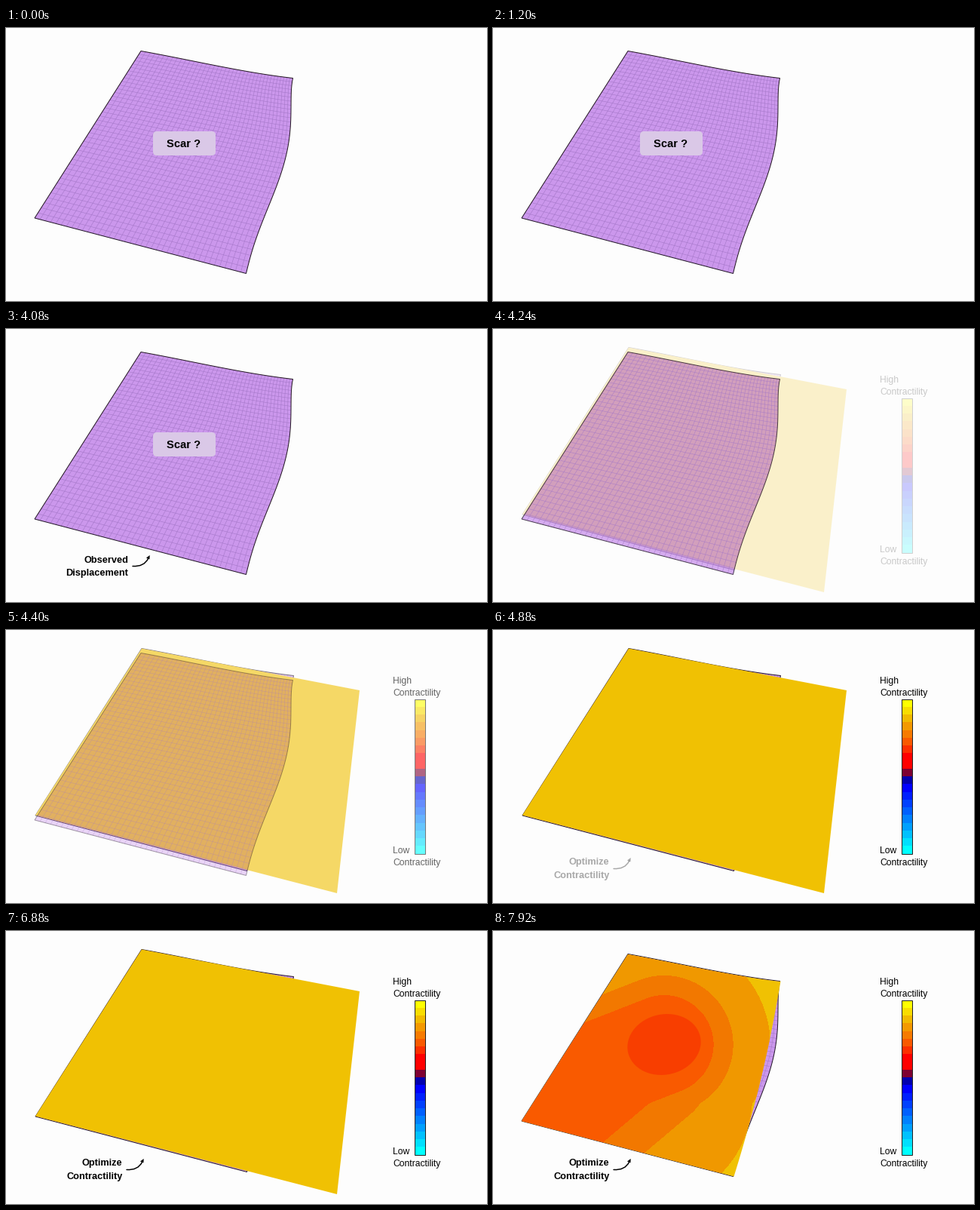
A matplotlib script for the animation above (8000 ms loop, 638 by 362 pixels).

```python
import numpy as np
import matplotlib.pyplot as plt
from matplotlib.animation import FuncAnimation
from matplotlib.collections import LineCollection
from matplotlib.colors import LinearSegmentedColormap
from matplotlib.patches import Ellipse, FancyBboxPatch, PathPatch, Polygon, Rectangle
from matplotlib.path import Path
from matplotlib.transforms import Affine2D

W, H, DPI = 638, 362, 100
STEP, FRAMES = 80, 100
PX = 72 / DPI
PAPER = "#fdfdfd"

plt.rcParams["font.family"] = "Liberation Sans"
fig = plt.figure(figsize=(W / DPI, H / DPI), dpi=DPI, facecolor=PAPER)
ax = fig.add_axes([0, 0, 1, 1])
ax.set(xlim=(0, W), ylim=(H, 0))
ax.axis("off")


def ramp(t, start, end):
    return float(np.clip((t - start) / (end - start), 0, 1))


# Sheet geometry: u runs along the top edge, v down the right edge
k = np.linspace(0, 1, 61)
A, B, C, D = np.array([(179, 30.5), (380.5, 66.5), (318.5, 325.5), (38, 252)])


def between(p, q, s):
    return p + np.asarray(s)[:, None] * (q - p)


def shifted(points, dx=0, dy=0):
    return points + np.c_[dx + 0 * points[:, 0], dy + 0 * points[:, 0]]


def sag(u):
    return 13 * u**2 * (1 - u)


def right_edge(v):
    return shifted(between(B, C, v), dx=322 * v**1.8 * (1 - v)**2.7)


top = shifted(between(A, B, k), dy=sag(k))
outline = np.vstack([top, right_edge(k), D])
fitted_right = shifted(between(B, C, k), dx=1 + 19 * k * (1 - k))
fitted = np.vstack([shifted(top, dy=0.5), fitted_right, D])

corners = np.array([(180, 24.5), (469, 80), (439, 349), (39, 245.5)])
flat = np.vstack([between(corners[0], corners[1], k),
                  between(corners[1], corners[2], k), corners[3]])


def mesh_line(u, v):
    v = v * (0.75 + 0.25 * v)
    s = u + 0.25 * u * (1 - u) * (1 - v)
    left = between(A, D, v)
    return shifted(left + s[:, None] * (right_edge(v) - left), dy=sag(s) * (1 - v))


ticks = [np.full_like(k, c) for c in np.linspace(0, 1, 41)[1:-1]]
mesh = [mesh_line(c, k) for c in ticks] + [mesh_line(k, c) for c in ticks]


def measured_sheet(z, transform=ax.transData):
    parts = [Polygon(outline, fc="#cb97ec", ec="none", zorder=z),
             LineCollection(mesh, colors="#a477c8", linewidths=0.55 * PX, zorder=z + 0.1),
             Polygon(outline, fill=False, ec="#24182a", lw=PX, zorder=z + 0.2)]
    for part in parts:
        ax.add_artist(part)
        part.set_transform(transform)
    return parts


def text(x, y, s, size, bold=False, **kw):
    return ax.text(x, y, s, fontsize=size * PX, color="black", va="baseline",
                   weight="bold" if bold else "normal", **kw)


def callout(lines, x, y, tail):
    """Two right-aligned lines with a small curved arrow."""
    parts = [text(x, y + 17.5 * i, s, 12.8, True, ha="right", zorder=20)
             for i, s in enumerate(lines)]
    curve = Path(np.array([(0, 0), (15, 1), (20.5, -10)]) + tail,
                 [Path.MOVETO, Path.CURVE3, Path.CURVE3])
    parts.append(ax.add_patch(PathPatch(curve, fill=False, lw=1.5 * PX,
                                        capstyle="round", zorder=20)))
    head = np.array([(22.7, -14.5), (22.4, -9), (18, -11)]) + tail
    parts.append(ax.add_patch(Polygon(head, fc="black", ec="none", zorder=20)))
    return parts


def set_alpha(parts, alpha):
    for part in parts:
        part.set_alpha(alpha)
        part.set_visible(alpha > 0)


# Opening scene, which dissolves over the model scene
frame_path = Path([(0, 0), (0, H), (W, H), (W, 0), (0, 0)], closed=True)
veil_path = Path.make_compound_path(
    frame_path, Path(np.vstack([outline, outline[:1]]), closed=True))
veil = ax.add_patch(PathPatch(veil_path, fc=PAPER, ec="none", zorder=10))
opening = [veil] + measured_sheet(11)

badge = ax.add_patch(FancyBboxPatch((200, 142), 73, 22, fc="#dac8e7", ec="none",
                                    boxstyle="round,pad=5,rounding_size=5", zorder=14))
scar = [badge, text(236, 158.5, "Scar ?", 14.8, True, ha="center", zorder=20)]
observed = callout(["Observed", "Displacement"], 162, 310, (168, 314.5))

# Model scene
shift = Affine2D()
measured_sheet(1, shift + ax.transData)
model = ax.add_patch(Polygon(flat, fc="#f0c103", ec="none", zorder=3))

# Contractility falls off with distance from a ray running to the lower left
core = np.array([227, 150.5])
axis = np.array([-0.93, 0.363])
gx, gy = np.meshgrid(np.arange(20, 400, 2), np.arange(20, 340, 2))
rx, ry = gx - core[0], gy - core[1]
along = rx * axis[0] + ry * axis[1]
across = ry * axis[0] - rx * axis[1]
field = np.hypot(across, np.minimum(along, 0)) + np.clip((245 - gy) / 2, -60, 8)

zone_map = Affine2D()
bands = ax.contourf(gx, gy, field, levels=[-100, 74, 100, 148], zorder=4,
                    colors=["#f95a00", "#f27800", "#f09800"])
spot = ax.add_patch(Ellipse(core, 98, 80, angle=-12, fc="#f83e00", ec="none", zorder=4.1))
zones = [bands, spot]
bands.set_transform(zone_map + ax.transData)
spot.set_transform(zone_map + ax.transData)

# Affine map that carries the fitted sheet's corners back to the flat sheet
to_flat = np.eye(3)
to_flat[:2] = np.linalg.solve(np.c_[[A, B, D], np.ones(3)], corners[[0, 1, 3]]).T

# Colour bar
STOPS = {0: "#ffff00", 2: "#f2b800", 5: "#f95a00", 7: "#ff0000", 8: "#ff0000",
         9: "#800030", 10: "#0000b0", 11: "#0000ff", 19: "#00ffff"}
scale = LinearSegmentedColormap.from_list("scale", [(i / 19, c) for i, c in STOPS.items()])
x0, y0, bw, bh = 541.5, 91.5, 14, 205
for i in range(20):
    ax.add_patch(Rectangle((x0, y0 + i * bh / 20), bw, bh / 20 + 0.3,
                           fc=scale(i / 19), ec="none", zorder=5))
ax.add_patch(Rectangle((x0, y0), bw, bh, fill=False, ec="#222222", lw=PX, zorder=6))
for y, word in [(71, "High"), (296, "Low")]:
    text(513.5, y, word, 12.1, zorder=6)
    text(513.5, y + 16, "Contractility", 12.1, zorder=6)

optimize = callout(["Optimize", "Contractility"], 154.5, 311.5, (160, 316.5))


def draw(i):
    t = i * STEP
    labels = 1 - ramp(t, 4080, 4240)
    set_alpha(scar, labels)
    set_alpha(observed, labels * ramp(t, 2240, 2720))
    set_alpha(opening, 1 - ramp(t, 4160, 4560))
    set_alpha(optimize, ramp(t, 4720, 5200))

    fit = ramp(t, 7680, 7920)
    shift.clear().translate(1 - fit, -6 * (1 - fit))
    model.set_xy(flat + fit * (fitted - flat))
    zone_map.set_matrix(to_flat + fit * (np.eye(3) - to_flat))
    set_alpha(zones, fit)
    for zone in zones:
        zone.set_clip_path(model)
    return []


anim = FuncAnimation(fig, draw, frames=FRAMES, interval=STEP, repeat=True, repeat_delay=0)
plt.show()
```
